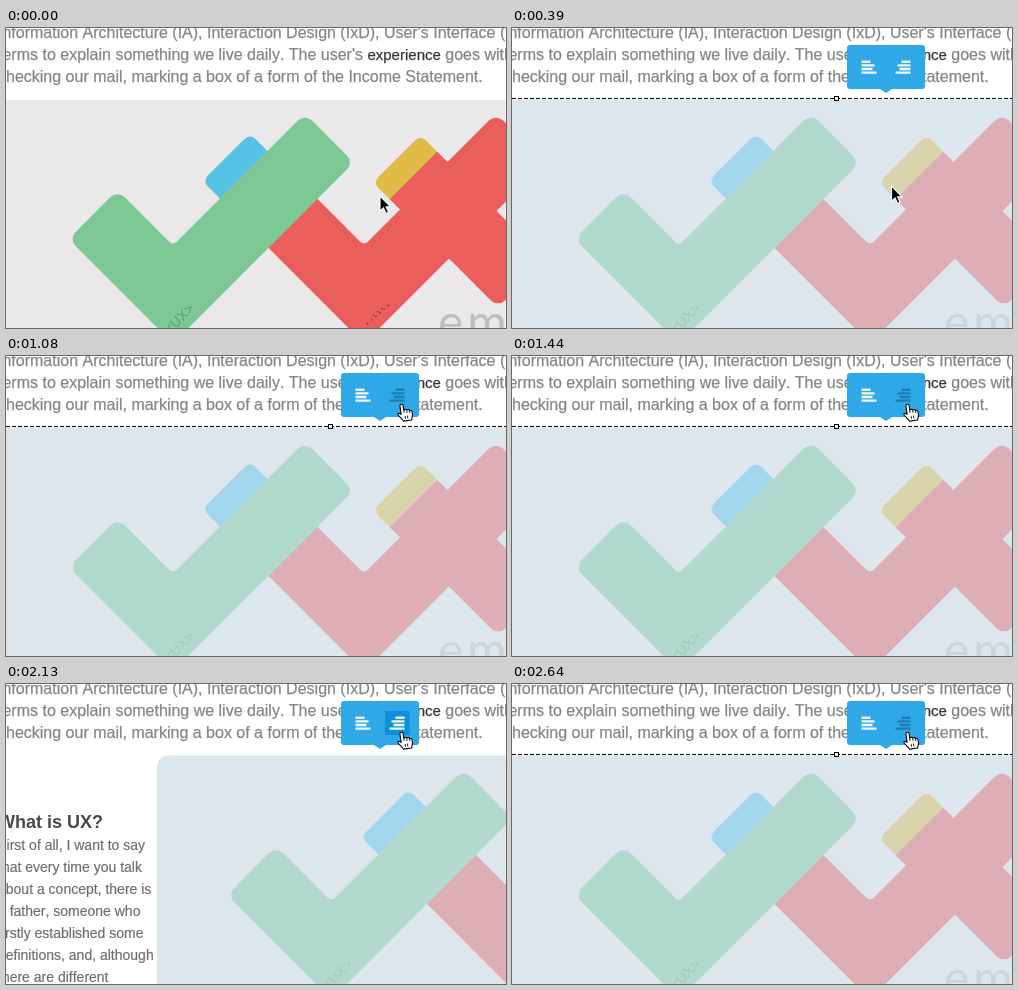
Recreate the animation shown at these times as an HTML page. Size 500 by 300 pixels, loop 3.64 s.

```html
<!DOCTYPE html>
<html lang="en">
<head>
<meta charset="utf-8">
<title>Image alignment</title>
<style>
  html, body { margin: 0; width: 100%; height: 100%; overflow: hidden; background: #fff; }
  svg { display: block; width: 500px; height: 300px; font-family: "Liberation Sans", Arial, sans-serif; font-kerning: none; }
  .lead { font-size: 16px; fill: #838787; stroke: #838787; stroke-width: .25; }
  .lead .key { font-size: 15px; fill: #38343a; stroke: #38343a; }
  .body { font-size: 14px; fill: #6e6e6e; stroke: #6e6e6e; stroke-width: .2; }
  .head { font-size: 18px; font-weight: bold; fill: #484848; }
</style>
</head>
<body>
<svg viewBox="0 0 500 300">
  <rect width="500" height="300" fill="#fff"/>
  <g class="lead">
    <text x="-8" y="10">Information Architecture (IA), Interaction Design (IxD), User's Interface (UI),</text>
    <text x="-8" y="32">terms to explain something we live daily. The user's <tspan class="key">experience</tspan> goes with</text>
    <text x="-8" y="54">checking our mail, marking a box of a form of the Income Statement.</text>
  </g>
  <g id="aside">
    <text class="head" x="-8" y="144">What is UX?</text>
  </g>

  <g id="image">
    <rect x="-7.5" y="72" width="664" height="400" rx="12" fill="#eae8e8"/>
    <g id="marks" transform="translate(.5 0)"></g>
    <text transform="translate(176.5 294) rotate(-45)" text-anchor="middle" font-size="14" fill="#5c9f74">&lt;UX&gt;</text>
    <g id="specks" stroke="#7a2c2c" stroke-width="1.2" stroke-dasharray="1.5 4">
      <path d="M361 296L383 277"/>
      <path d="M364 290L380 277" stroke-dashoffset="2"/>
    </g>
    <text x="432" y="311" font-size="48" letter-spacing="4" fill="#bfbdbe" style="font-family:Lato,sans-serif">emo</text>
    <rect id="tint" x="-7.5" y="71" width="664" height="400" rx="12" fill="#d5e5f2" opacity=".6"/>
  </g>

  <g id="frame">
    <path d="M0 70.5H500" stroke="#000" stroke-dasharray="4 2"/>
    <rect x="322.5" y="68.5" width="4" height="4" fill="#fff" stroke="#000"/>
  </g>

  <g id="menu">
    <path d="M338 17H410Q413 17 413 20V58Q413 61 410 61H380L374 65L368 61H338Q335 61 335 58V20Q335 17 338 17Z" fill="#2fa8e7"/>
    <rect id="pressed" x="379" y="27" width="24.5" height="24" fill="#0f8fd5"/>
    <path id="left" fill="#f2f8f6"/>
    <path id="right"/>
  </g>

  <circle id="ring" cx="374" cy="170" fill="none" stroke="#0c0c10" stroke-width="3"/>
  <g id="cursor">
    <path id="arrow" d="M0 0V15L3.5 11.8L6 17.4L8.5 16.3L6.1 10.8H10.6Z" fill="#000" stroke="#fff" stroke-width="1.1"/>
    <g id="hand" transform="translate(-1.5 1.2) rotate(-8)" stroke="#000" stroke-linejoin="round">
      <path d="M-1.8 1.6C-1.8-.4 1.4-.4 1.4 1.6V6.2C2.4 5.2 4 5.4 4.3 6.6C5.4 5.8 6.8 6.2 7 7.4C8.2 6.9 9.4 7.6 9.4 9V12C9.4 14 8 14.6 8 17H-.5C-.8 15-4.8 11.5-5 9.8C-5 8.4-3.2 8.2-1.8 10Z" fill="#fff" stroke-width="1.1"/>
      <path d="M1.4 6V9M4.3 6.8V9.4M7 7.6V10M2 12V15M4.3 12V15" fill="none" stroke-width=".8"/>
    </g>
  </g>
</svg>
<script>
const LOOP = 3640;
const SELECT = 90, MENU = 240, MOVE = 270, MOVE_TIME = 706, ALIGN = 1530, RESET = 2370;
const $ = id => document.getElementById(id);
const clamp = v => Math.max(0, Math.min(1, v));
const smooth = v => v * v * (3 - 2 * v);

function add(parent, tag, attrs, text = "") {
  const el = document.createElementNS("http://www.w3.org/2000/svg", tag);
  for (const k in attrs) el.setAttribute(k, attrs[k]);
  el.textContent = text;
  parent.append(el);
}

// Corners are [x + y, x - y, radius], since every edge is diagonal.
function diagonal(corners) {
  const pts = corners.map(([s, d, r = 0]) => ({ x: (s + d) / 2, y: (s - d) / 2, r }));
  const n = pts.length;
  return pts.map((p, i) => {
    const a = pts[(i + n - 1) % n], b = pts[(i + 1) % n];
    const toward = q => {
      const k = p.r / Math.hypot(q.x - p.x, q.y - p.y);
      return `${p.x + (q.x - p.x) * k} ${p.y + (q.y - p.y) * k}`;
    };
    const turn = (p.x - a.x) * (b.y - p.y) - (p.y - a.y) * (b.x - p.x);
    const start = (i ? "L" : "M") + toward(a);
    return p.r ? `${start}A${p.r} ${p.r} 0 0 ${turn > 0 ? 1 : 0} ${toward(b)}` : start;
  }).join("") + "Z";
}

const check = (sum, diff) => [
  [sum - 111, diff, 10], [sum, diff, 5], [sum, diff + 264, 10],
  [sum + 98, diff + 264, 10], [sum + 98, diff - 98, 10], [sum - 111, diff - 98, 10]
];
const bar = (s0, s1, d0, d1, r0, r1) => [[s0, d0, r0], [s0, d1, r0], [s1, d1, r1], [s1, d0, r1]];

[
  ["#ea5e5c", check(575, 140)],
  ["#ea5e5c", bar(554, 771, 212, 307, 0, 10)],
  ["#56c2e4", bar(349, 420, 43, 138, 7, 0)],
  ["#dfbc45", bar(521, 554, 212, 307, 7, 0)],
  ["#7ec896", check(384, -51)]
].forEach(([fill, corners]) => add($("marks"), "path", { d: diagonal(corners), fill }));

["First of all, I want to say", "that every time you talk", "about a concept, there is",
 "a father, someone who", "firstly established some", "definitions, and, although",
 "there are different"
].forEach((line, i) => add($("aside"), "text", { class: "body", x: -8, y: 166 + 22 * i }, line));

const rows = [9, 13, 11, 15];
const icon = (x, dir) => rows.map((w, i) => `M${x} ${32.6 + 3.6 * i}h${w * dir}v2.4h${-w * dir}z`).join("");
$("left").setAttribute("d", icon(349.5, 1));
$("right").setAttribute("d", icon(398.5, -1));

const show = (id, on) => $(id).style.display = on ? "" : "none";
const bezier = (u, a, b, c) => (1 - u) ** 2 * a + 2 * u * (1 - u) * b + u * u * c;

function draw(t) {
  const selected = t >= SELECT;
  const aligned = t >= ALIGN && t < RESET;
  show("tint", selected);
  show("specks", !selected);
  show("frame", selected && !aligned);
  show("aside", aligned);
  $("image").setAttribute("transform", `translate(${aligned ? 158.5 : 0} 0)`);

  const grow = clamp((t - 30) / 120);
  show("ring", t >= 30 && t < 300);
  $("ring").setAttribute("r", 20.8 * (1 - (1 - grow) ** 2));
  $("ring").setAttribute("opacity", 1 - clamp((t - 150) / 150));

  const u = smooth(clamp((t - MOVE) / MOVE_TIME));
  const x = bezier(u, 374, 411.5, 397), y = bezier(u, 168, 104.4, 47);
  $("cursor").setAttribute("transform", `translate(${x} ${y})`);
  show("arrow", y >= 61);
  show("hand", y < 61);

  $("menu").setAttribute("opacity", clamp((t - MENU) / 90));
  show("pressed", aligned);
  $("right").setAttribute("fill", y < 51 && !aligned ? "#1d7db5" : "#f2f8f6");
}

const began = performance.now();
function tick() {
  draw((performance.now() - began) % LOOP);
  requestAnimationFrame(tick);
}
draw(0);
requestAnimationFrame(tick);
</script>
</body>
</html>
```
